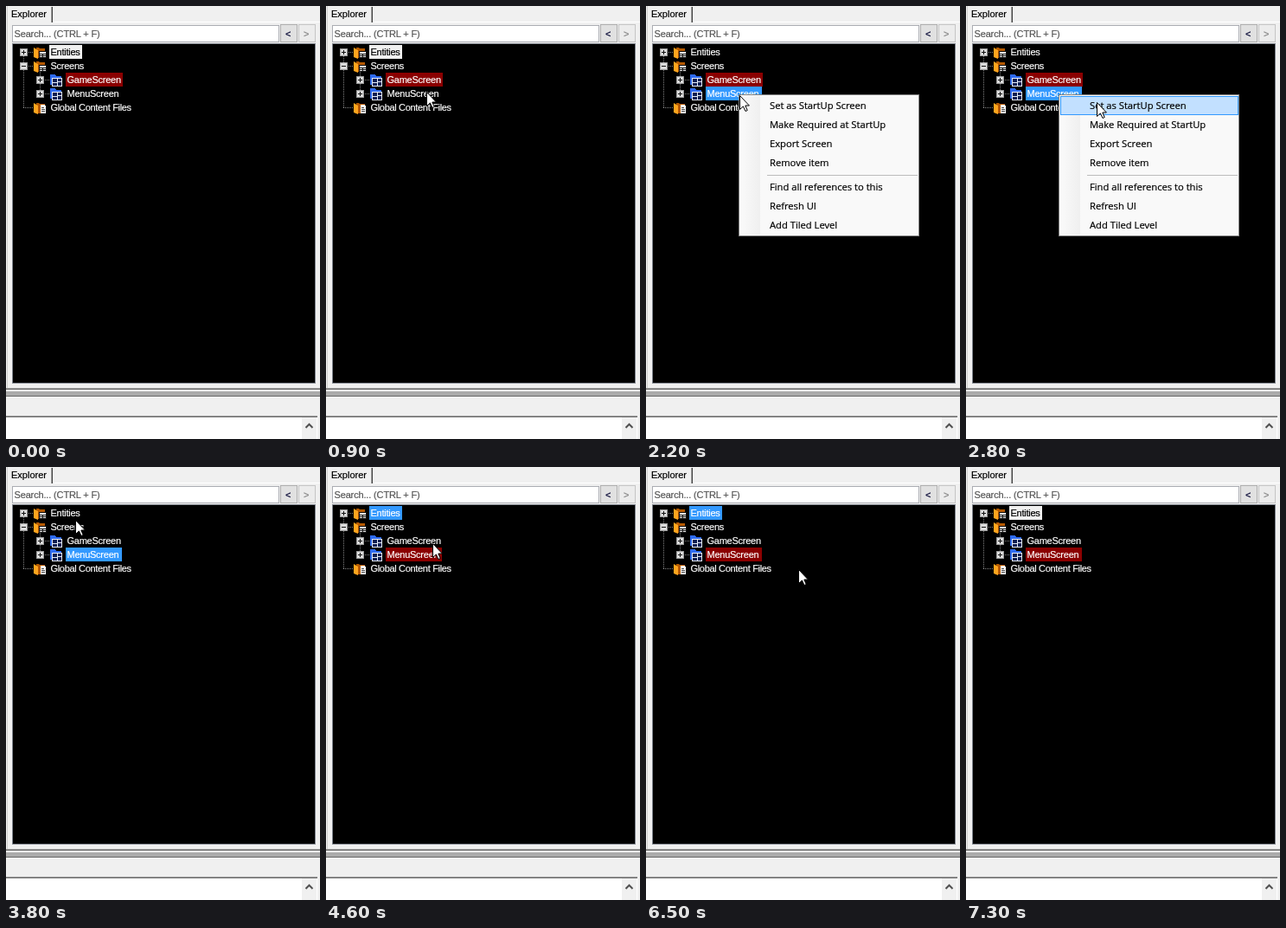
An HTML page that plays this animation: 363 by 500 pixels, repeating every 7400 ms.

```html
<!DOCTYPE html>
<html lang="en">
<head>
<meta charset="utf-8">
<title>Explorer tree</title>
<style>
  html, body { margin: 0; width: 100%; height: 100%; overflow: hidden; background: #f0f0f0; }
  svg { display: block; width: 363px; height: 500px; }
  text { font: 11px "Liberation Sans", Arial, sans-serif; letter-spacing: -.25px; stroke-width: .2px; white-space: pre; }
  #menu text { font: 11.2px "Open Sans", "Noto Sans", sans-serif; letter-spacing: 0; }
  rect, .crisp { shape-rendering: crispEdges; }
</style>
</head>
<body>
<svg viewBox="0 0 363 500" xmlns="http://www.w3.org/2000/svg">
  <defs>
    <linearGradient id="strip">
      <stop stop-color="#fafafa"/><stop offset="1" stop-color="#efefef"/>
    </linearGradient>
    <g id="folder">
      <path d="M3 2h3l1 1h6v4h-2v7H4z" fill="#b65a00"/>
      <path d="M0 2l5 3v10l-5-2z" fill="#ffa51e"/>
    </g>
    <g id="panes" class="crisp">
      <path d="M6 7h9v8H6z" fill="#111"/>
      <path d="M7 8h7v2H7zM7 11h3v1H7zM11 11h3v1h-3zM7 13h3v1H7zM11 13h3v1h-3z" fill="#fff"/>
    </g>
    <g id="sheet" class="crisp">
      <path d="M8 5h4l2 2v8H8z" fill="#fff"/>
      <path d="M9 8.5h3M9 10.5h4M9 12.5h4" stroke="#444"/>
    </g>
    <g id="screen" class="crisp">
      <path d="M0 0h6l1 2h6v2H2v8H0z" fill="#2f6bf0"/>
      <path d="M2.5 4.5h11v9h-11zM8.5 4.5v9M2.5 9.5h6M8.5 8.5h5" fill="#0a1c50" stroke="#e4eaf6"/>
    </g>
  </defs>

  <rect width="363" height="500" fill="#f0f0f0"/>
  <g id="frame"></g>
  <g id="tree"></g>
  <g id="menu"></g>
  <path id="cursor" d="M-.5 1.5v16l3.9-3.6l2.6 5.6l2.2-1l-2.4-5.5h4.6z" fill="#fff" stroke="#000"/>
</svg>
<script>
const LOOP = 7400, STEP = 100;
const BLUE = "#3399ff", RED = "#8b0000", PALE = "#f0f0f0";
const $ = id => document.getElementById(id);

function add(parent, tag, attrs, text) {
  const el = document.createElementNS("http://www.w3.org/2000/svg", tag);
  for (const k in attrs) el.setAttribute(k, attrs[k]);
  if (text) el.textContent = text;
  return parent.appendChild(el);
}
const box = (p, x, y, width, height, fill) => add(p, "rect", { x, y, width, height, fill });
const label = (p, x, y, s, fill) => add(p, "text", { x, y, fill, stroke: fill }, s);
function bordered(p, x, y, w, h, edge, fill) {
  box(p, x, y, w, h, edge);
  box(p, x + 1, y + 1, w - 2, h - 2, fill);
}

function buildFrame() {
  const f = $("frame");
  box(f, 54, 18, 309, 1, "#fff");
  box(f, 1, 0, 1, 441, "#d0d0d0");
  box(f, 52, 1, 1, 18, "#a0a0a0");
  box(f, 53, 1, 1, 18, "#404040");
  label(f, 6, 13, "Explorer", "#000").style.letterSpacing = "0";

  bordered(f, 7, 22, 309, 20, "#abadb3", "#fff");
  label(f, 9.5, 36, "Search... (CTRL + F)", "#555").style.letterSpacing = "-.15px";
  bordered(f, 317, 21, 20, 21, "#adadad", "#e1e1e1");
  bordered(f, 338, 21, 20, 21, "#c4c4c4", "#ececec");
  label(f, 323, 36, "<", "#000030");
  label(f, 344, 36, ">", "#838383");
  bordered(f, 7, 43, 351, 393, "#828790", "#000");

  // Splitter and lower pane
  box(f, 0, 441, 363, 1, "#a0a0a0");
  box(f, 0, 442, 363, 1, "#696969");
  box(f, 0, 445, 363, 5, "#ababab");
  box(f, 0, 450, 363, 1, "#696969");
  box(f, 0, 473, 360, 1, "#a0a0a0");
  box(f, 0, 474, 360, 1, "#696969");
  box(f, 0, 475, 342, 25, "#fff");
  box(f, 359, 475, 1, 25, "#fff");
  add(f, "path", { d: "M346.5 487l4-4l4 4", fill: "none", stroke: "#505050", "stroke-width": 2 });
}

const dots = d => add($("tree"), "path", { d, class: "crisp", stroke: "#808080", "stroke-dasharray": 1 });
const icon = (name, x, y) => add($("tree"), "use", { href: "#" + name, x, y });

function expander(x, y, open) {
  const t = $("tree");
  bordered(t, x - 4, y - 4, 9, 9, "#9a9a9a", "#dcdcdc");
  box(t, x - 2, y, 5, 1, "#111");
  if (!open) box(t, x, y - 2, 1, 5, "#111");
}

// One tree line; depth sets the indent, width the highlight
function row(index, depth, width, name) {
  const y = 53 + index * 16, x = 50 + depth * 19, leaf = index === 4;
  dots(`M${x - 30} ${y + .5}h12`);
  if (!leaf) expander(x - 30, y, index === 1);
  if (depth) icon("screen", x - 18, y - 6);
  else {
    icon("folder", x - 18, y - 7);
    icon(leaf ? "sheet" : "panes", x - 18, y - 8);
  }
  return {
    back: box($("tree"), x, y - 8, width, 16, "none"),
    text: label($("tree"), x + 1.5, y + 4, name, "#fff")
  };
}

function buildTree() {
  dots("M20.5 58v60");
  dots("M39.5 76v26");
  const entities = row(0, 0, 38, "Entities");
  row(1, 0, 40, "Screens");
  const game = row(2, 1, 66, "GameScreen");
  const second = row(3, 1, 65, "MenuScreen");
  row(4, 0, 96, "Global Content Files").text.style.letterSpacing = "-.32px";
  return { entities, game, second };
}

function buildMenu() {
  const m = $("menu");
  bordered(m, 107, 102, 209, 164, "#808080", "#f9f9f9");
  box(m, 109, 104, 23, 160, "url(#strip)");
  const hot = add(m, "g", {});
  bordered(hot, 109, 104, 206, 22, BLUE, "#c2e0ff");
  box(m, 140, 195, 174, 1, "#bdbdbd");
  ["Set as StartUp Screen", "Make Required at StartUp", "Export Screen", "Remove item",
   "Find all references to this", "Refresh UI", "Add Tiled Level"]
    .forEach((s, i) => label(m, 143, 119 + i * 22 + (i > 3 ? 6 : 0), s, "#000"));
  return hot;
}

const linear = k => k;
const easeOut = k => 1 - (1 - k) ** 2.5;
const smooth = k => k * k * (3 - 2 * k);

// The pointer circles the two screen rows clockwise
const CIRCLE_START = 4900, CIRCLE_END = 6300;
function circle(t) {
  const a = (t - 5000) * 4.58 / 800;
  return { x: 101 + 48 * Math.cos(a), y: 97 + 15.5 * Math.sin(a) };
}

const leg = (from, to, x, y, ease = linear) => ({ from, to, x, y, ease });
const onCircle = circle(CIRCLE_START), offCircle = circle(CIRCLE_END);
const legs = [
  leg(300, 300, 284, 114),
  leg(300, 1000, 116, 98, easeOut),
  leg(1300, 1700, 107, 102),
  leg(2100, 2800, 152, 110, smooth),
  leg(3300, 3800, 81, 60, smooth),
  leg(3800, 4100, 59, 56, easeOut),
  leg(4100, 4600, 124, 87),
  leg(4600, CIRCLE_START, onCircle.x, onCircle.y),
  leg(CIRCLE_END, CIRCLE_END, offCircle.x, offCircle.y),
  leg(CIRCLE_END, 6600, 206, 120),
  leg(6600, 6900, 346, 45)
];

function tip(t) {
  if (t > CIRCLE_START && t < CIRCLE_END) return circle(t);
  let { x, y } = legs[0];
  for (const l of legs) {
    if (t < l.from) break;
    const k = t >= l.to ? 1 : l.ease((t - l.from) / (l.to - l.from));
    x += (l.x - x) * k;
    y += (l.y - y) * k;
  }
  return { x, y };
}

const show = (el, on) => el.setAttribute("visibility", on ? "visible" : "hidden");
function paint(item, fill) {
  const ink = fill === PALE ? "#000" : "#fff";
  item.back.setAttribute("fill", fill);
  item.text.setAttribute("fill", ink);
  item.text.setAttribute("stroke", ink);
}

buildFrame();
const rows = buildTree();
const hot = buildMenu();

function draw(ms) {
  const t = Math.floor(ms % LOOP / STEP) * STEP;
  paint(rows.entities, t < 1100 || t >= 7300 ? PALE : t < 4100 ? "none" : BLUE);
  paint(rows.game, t < 3100 ? RED : "none");
  paint(rows.second, t < 1100 ? "none" : t < 4100 ? BLUE : RED);

  const { x, y } = tip(t);
  const open = t >= 1800 && t < 3100;
  show($("menu"), open);
  show(hot, open && y >= 103);
  show($("cursor"), t >= 300 && t < 7000);
  $("cursor").setAttribute("transform", `translate(${Math.round(x)} ${Math.round(y)})`);
}

const start = performance.now();
function tick() {
  draw(performance.now() - start);
  requestAnimationFrame(tick);
}
tick();
</script>
</body>
</html>
```
